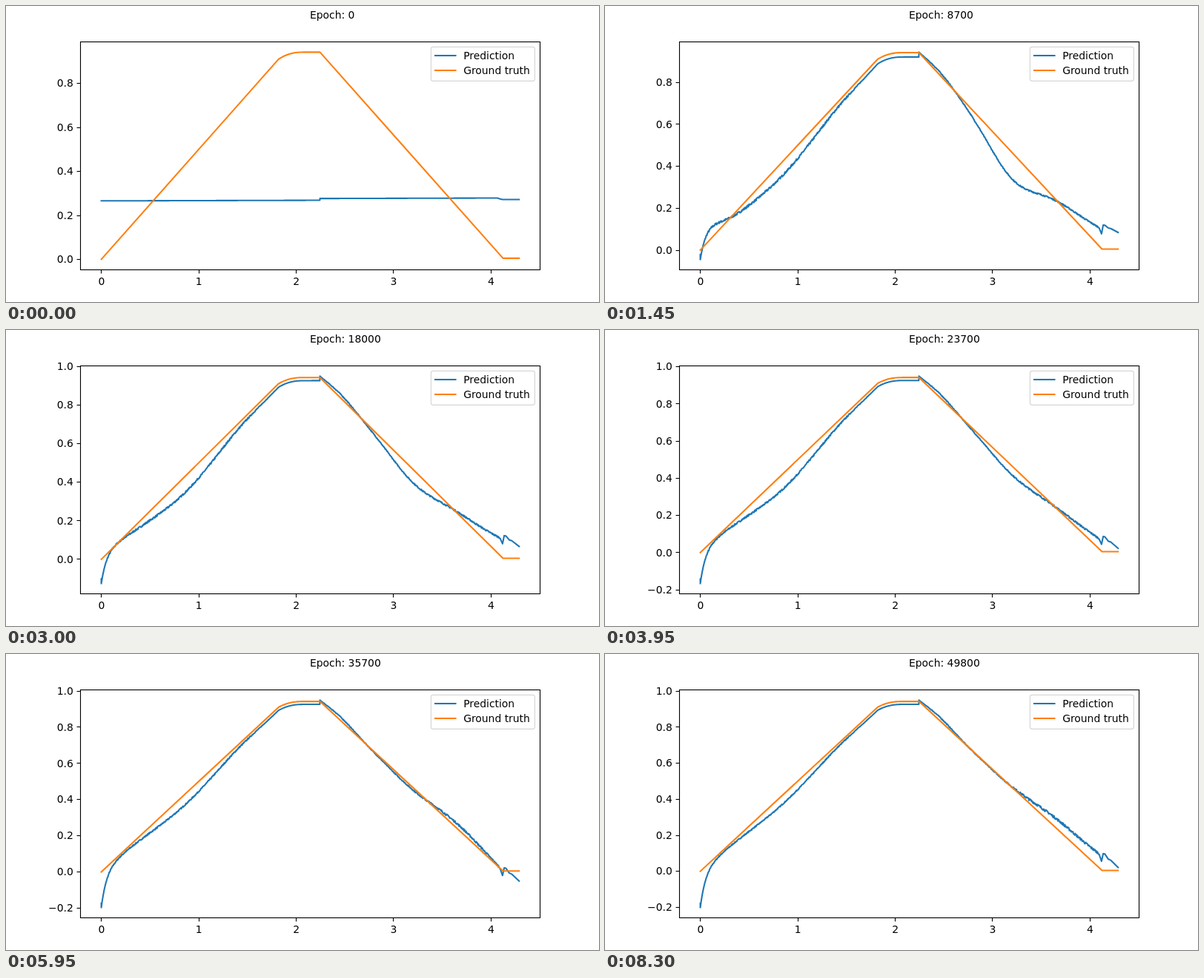
Recreate the animation shown at these times as an HTML page. Size 800 by 400 pixels, loop 8350 ms.

```html
<!DOCTYPE html>
<html lang="en">
<head>
<meta charset="utf-8">
<title>Training progress</title>
<style>
html, body { margin: 0; width: 100%; height: 100%; overflow: hidden; background: #fff; }
svg { display: block; width: 800px; height: 400px; }
text { font: 13.89px "DejaVu Sans", sans-serif; fill: #000; white-space: pre; }
.axis { fill: none; stroke: #000; stroke-width: 1.11; }
.line { fill: none; stroke-width: 2.083; stroke-linejoin: round; stroke-linecap: square; }
.blue { stroke: #1f77b4; }
.orange { stroke: #ff7f0e; }
.end { text-anchor: end; }
.mid { text-anchor: middle; }
</style>
</head>
<body>
<svg viewBox="0 0 800 400">
  <g transform="translate(.4 .4)">
    <path id="pred" class="line blue"/>
    <path id="truth" class="line orange"/>
  </g>
  <g id="xaxis"></g>
  <g id="yaxis"></g>
  <rect class="axis" x="100.5" y="48.5" width="620" height="308"/>
  <text id="epoch" x="410" y="17"></text>
  <rect x="573.4" y="55.3" width="140" height="46" rx="2.8" fill="#fff" stroke="#ccc" stroke-width="1.2" opacity=".8"/>
  <path class="line blue" d="M579 67H606.5"/>
  <path class="line orange" d="M579 87H606.5"/>
  <text x="617.2" y="72">Prediction</text>
  <text x="617.2" y="92">Ground truth</text>
</svg>
<script>
const STEP = 50, STEPS = 167, EPOCHS = 300, SECONDS = 8.35;
const LEFT = 100, TOP = 48, BOTTOM = 356;
const X0 = 128.18, XS = 131.38;
const JUMP = 2.245, DIP = 4.095, END = 4.29;

const $ = id => document.getElementById(id);
const mix = (a, b, k) => a + (b - a) * k;
const bell = (x, c, w) => Math.exp(-(((x - c) / w) ** 2));
const ease = (a, b, x) => {
  const k = Math.min(1, Math.max(0, (x - a) / (b - a)));
  return k * k * (3 - 2 * k);
};
const range = (a, b, n) => Array.from({ length: n + 1 }, (_, i) => mix(a, b, i / n));

// Straight ramps with a rounded shoulder before the plateau
function truth(x) {
  if (x > JUMP) return Math.max(.005, .942 - .4984 * (x - JUMP));
  if (x < 1.82) return x / 2;
  return .942 - .032 * Math.max(0, (2.08 - x) / .26) ** 2.4;
}

const untrained = x => .266 + .0012 * x + (x >= JUMP ? .008 : 0) - .007 * ease(4.06, 4.12, x);

// Errors of the fitted curve at t seconds
function errors(t) {
  const start = -.198 / (1 + Math.exp((2.6 - t) / .9));
  const lift = .25 * Math.exp(-t / 1.4);
  const sag = .05 + .035 * bell(t, 3.4, 2.2);
  const valley = .22 * Math.exp(-t / 2.6);
  const bulge = .04 * ease(4.5, 6.5, t);
  const tail = .047 + .055 * Math.cos(.85 * (t - 2.3));
  const drop = .08 * (1 - Math.exp(-t / 2.5));

  const rise = x => (start - lift) * Math.exp(-x / .055) + lift * bell(x, 0, .25)
    - sag * bell(x, .87, .5) - .016 * ease(1.3, 1.8, x);
  const fall = x => .02 * bell(x, 2.45, .2) - valley * bell(x, 3.2, .35)
    + bulge * bell(x, 3.65, .4) + tail * Math.max(0, (x - 3) / 1.1) ** 3;
  return { rise, fall, tail, drop };
}

let seed = 7;
const random = () => (seed = seed * 16807 % 2147483647) / 2147483647;
const noise = range(0, 1, 1100).map(() => 2 * random() - 1);

function roughness(x, age) {
  if (x < JUMP) return mix(.0055, .003, age) * ease(0, .1, x) * (1 - ease(1.4, 1.85, x));
  return (.0025 + .004 * age * ease(3, 3.4, x)) * ease(JUMP, 2.4, x);
}

function prediction(t) {
  const { rise, fall, tail, drop } = errors(t);
  const fit = 1 - Math.exp(-((t / .5) ** 1.5));
  const point = (x, y) => [x, mix(untrained(x), y, fit)];
  const rough = (err, shift) => (x, i) =>
    point(x, truth(x) + err(x) + noise[i + shift] * roughness(x, t / SECONDS));

  const up = range(0, JUMP - .001, 560).map(rough(rise, 0));
  const down = range(JUMP, DIP, 460).map(rough(fall, 561));
  const top = tail + .03;
  const rebound = [point(4.12, tail - .012), point(4.137, top), point(4.155, top - .03 * drop),
    point(4.19, top - .4 * drop), point(4.215, top - .47 * drop), point(END, top - drop)];
  return [up[0], [0, up[0][1] + .024 * fit], ...up, ...down, ...rebound];
}

const goal = [0, ...range(1.82, 2.08, 12), JUMP, 4.125, END].map(x => [x, truth(x)]);

const px = x => X0 + XS * x;
const path = (pts, py) =>
  "M" + pts.map(([x, y]) => px(x).toFixed(2) + " " + py(y).toFixed(2)).join("L");

$("xaxis").innerHTML = range(0, 4, 4).map(i =>
  `<path class="axis" d="M${Math.round(px(i)) + .5} 356.5v5"/>`
  + `<text class="mid" x="${px(i) + .7}" y="377">${i}</text>`).join("");

function draw(step) {
  const pred = prediction(step * STEP / 1000);
  const ys = [...pred, ...goal].map(p => p[1]);
  const low = Math.min(...ys), high = Math.max(...ys), pad = (high - low) * .05;
  const scale = (BOTTOM - TOP) / (high - low + 2 * pad);
  const py = y => BOTTOM - (y - low + pad) * scale;
  $("pred").setAttribute("d", path(pred, py));
  $("truth").setAttribute("d", path(goal, py));
  let ticks = "";
  for (let i = -2; i <= 5; i++) {
    const y = py(i / 5);
    if (y < TOP - .7 || y > BOTTOM + .5) continue;
    const label = (i < 0 ? "\u2212" : "") + Math.abs(i / 5).toFixed(1);
    ticks += `<path class="axis" d="M${LEFT - 4.5} ${Math.round(y) + .5}h5"/>`
      + `<text class="end" x="90.8" y="${Math.round(y + 5.2)}">${label}</text>`;
  }
  $("yaxis").innerHTML = ticks;
  $("epoch").textContent = "Epoch: " + step * EPOCHS;
}

const begin = performance.now();
let shown = -1;
function tick() {
  const step = Math.floor(Math.max(0, performance.now() - begin) / STEP) % STEPS;
  if (step !== shown) draw(shown = step);
  requestAnimationFrame(tick);
}
tick();
</script>
</body>
</html>
```
